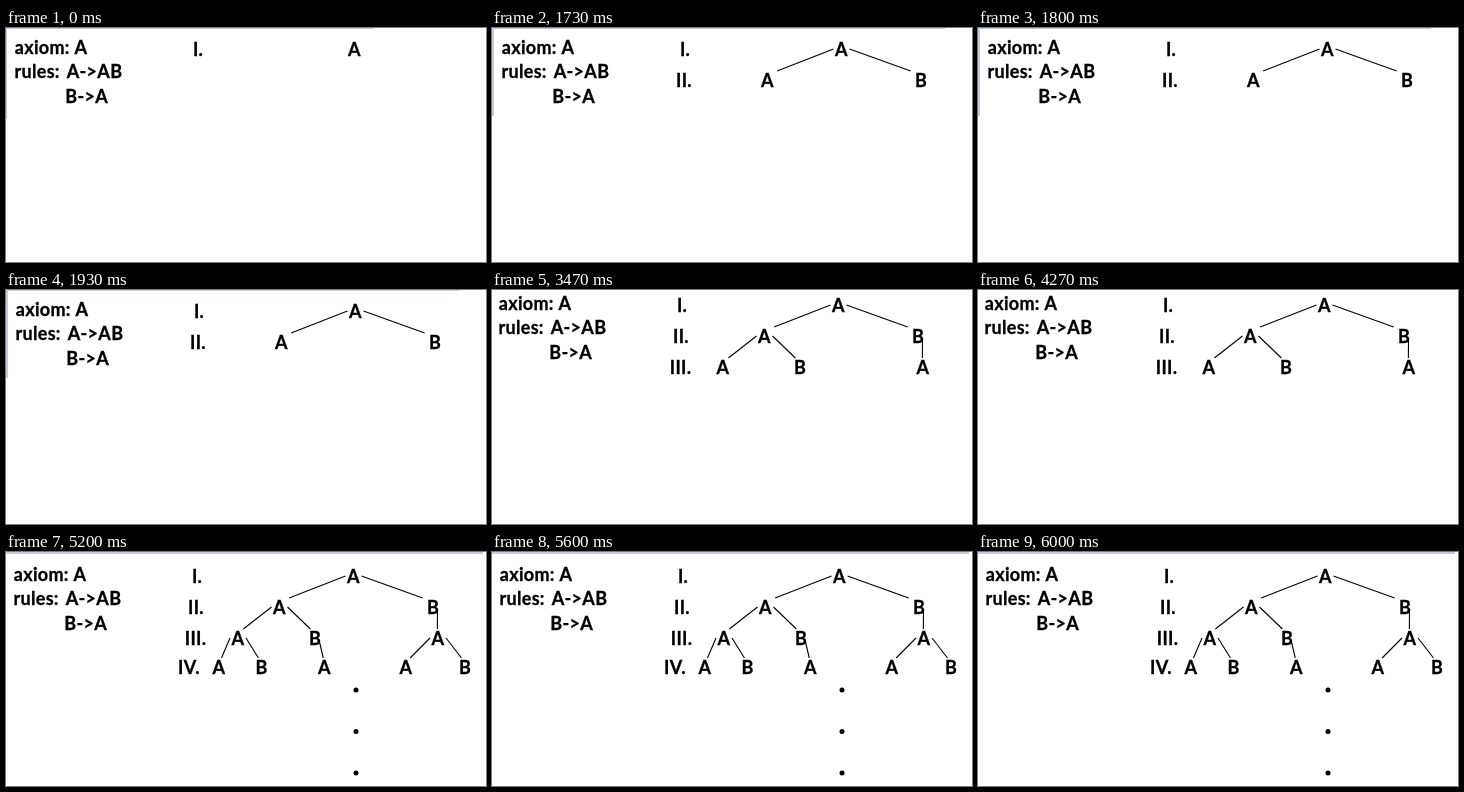
Write an HTML page with a canvas that moves like this. It is 480 px wide and 234 px high and loops after 6.94 s.

```html
<!DOCTYPE html>
<html lang="en">
<head>
<meta charset="utf-8">
<title>L-system growth</title>
<style>
html, body { margin: 0; width: 100%; height: 100%; overflow: hidden; background: #fff; }
canvas { display: block; }
</style>
</head>
<body>
<canvas id="stage" width="480" height="234"></canvas>
<script>
const ctx = document.getElementById('stage').getContext('2d');
const LOOP = 6940;
const STEP = LOOP / 4;
const RULES = { A: 'AB', B: 'A' };

// All positions are relative to the root letter.
const rows = [
  { name: 'I.', nameX: -156.5, y: 0, xs: [0] },
  { name: 'II.', nameX: -157.5, y: 31, xs: [-74, 79.5] },
  { name: 'III.', nameX: -158, y: 62, xs: [-115.5, -38.5, 84.5] },
  { name: 'IV.', nameX: -164.5, y: 91, xs: [-134.5, -92, -29, 52.5, 111.5] }
];

// Each scene shows one more row; the whole sheet sits slightly differently.
const scenes = [
  { root: [348.5, 21], top: [368, 1], left: [1, 91] },
  { root: [349.5, 21], top: [453, 1], left: [2, 88] },
  { root: [346.5, 15], top: [0, 0], left: [0, 0] },
  { root: [347.5, 24], top: [477, 2], left: [0, 0], dots: 3 }
];

function label(text, x, midY, align = 'center') {
  ctx.textAlign = align;
  ctx.fillText(text, x, midY + 6.5);
  ctx.strokeText(text, x, midY + 6.5);
}

function drawRules() {
  const put = (text, x, line) => label(text, x, -2 + line * 24.6, 'left');
  put('axiom:', -339.7, 0);
  put('A', -280, 0);
  put('rules:', -340, 1);
  put('A->AB', -287.7, 1);
  put('B->A', -289.2, 2);
}

function branch(px, py, cx, cy, onlyChild) {
  const side = Math.sign(cx - px);
  if (onlyChild) ctx.moveTo(px + 4.5, py + 4);
  else ctx.moveTo(px + side * 8, py);
  ctx.lineTo(cx + (px - cx) * 0.13, cy - 9);
}

function drawTree(count) {
  let word = 'A';
  ctx.beginPath();
  for (let r = 0; r < count; r++) {
    const row = rows[r], below = rows[r + 1];
    label(row.name, row.nameX, row.y);
    let next = '';
    [...word].forEach((letter, i) => {
      label(letter, row.xs[i], row.y);
      const children = RULES[letter];
      if (r + 1 < count) {
        for (let k = 0; k < children.length; k++) {
          branch(row.xs[i], row.y, below.xs[next.length + k], below.y, children.length === 1);
        }
      }
      next += children;
    });
    word = next;
  }
  ctx.lineWidth = 1.1;
  ctx.stroke();
}

function draw(index) {
  const { root, top, left, dots = 0 } = scenes[index];
  ctx.fillStyle = '#fff';
  ctx.fillRect(0, 0, 480, 234);
  ctx.fillStyle = '#c4cbe0';
  ctx.fillRect(0, 0, ...top);
  ctx.fillRect(0, 0, ...left);

  ctx.save();
  ctx.translate(...root);
  ctx.fillStyle = ctx.strokeStyle = '#000';
  ctx.font = 'bold 18px Lato, sans-serif';
  ctx.letterSpacing = '0.3px';
  ctx.lineWidth = 0.3;
  drawRules();
  drawTree(index + 1);
  for (let i = 0; i < dots; i++) {
    ctx.beginPath();
    ctx.arc(2.5, 114 + i * 41.5, 2.5, 0, Math.PI * 2);
    ctx.fill();
  }
  ctx.restore();
}

const start = performance.now();
function tick() {
  const t = (performance.now() - start) % LOOP;
  // Scene changes fall on whole 10 ms ticks.
  draw(Math.min(3, Math.floor((t + 5) / STEP)));
  requestAnimationFrame(tick);
}
tick();
</script>
</body>
</html>
```
